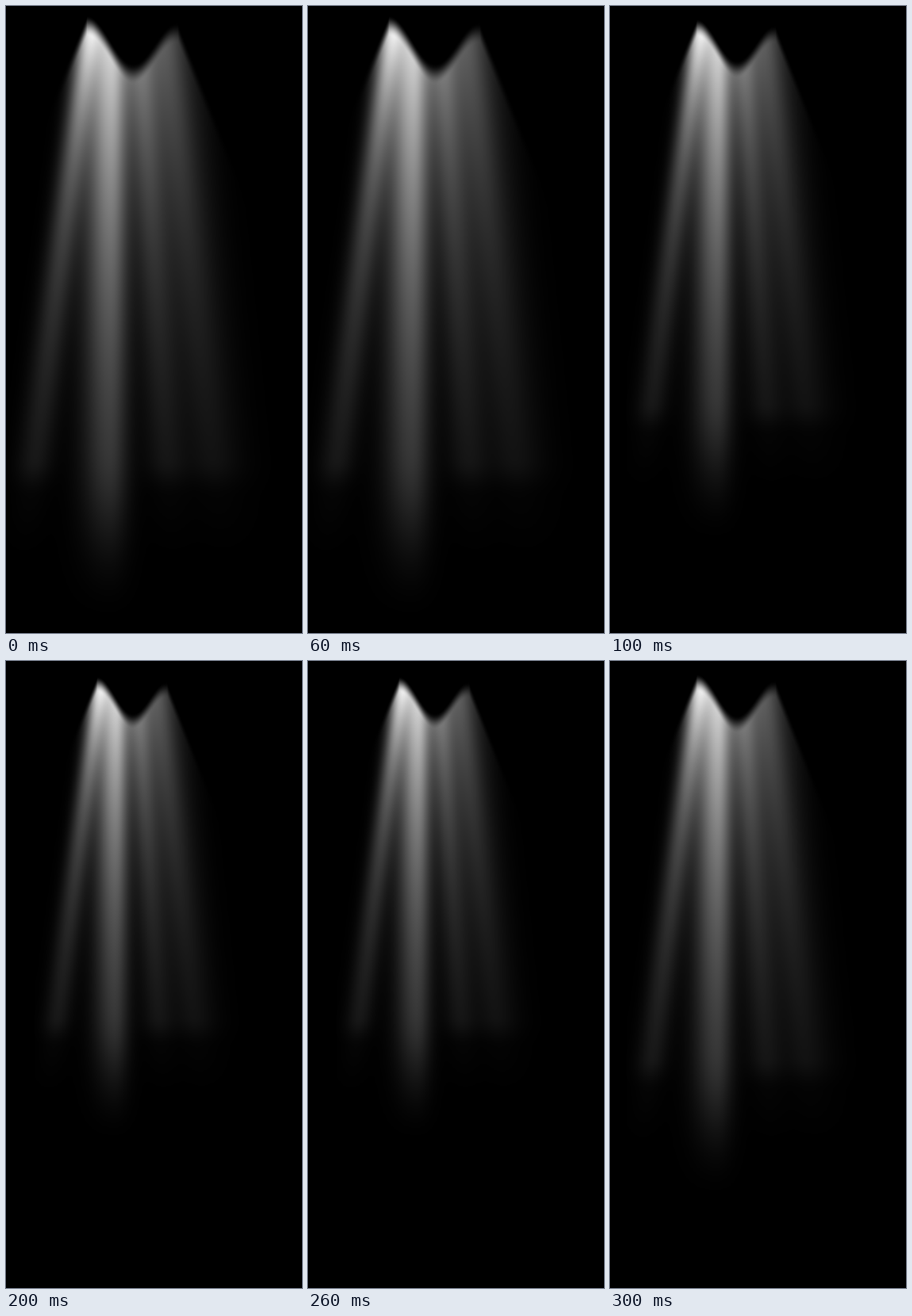
These frames come from a looping animation (373 by 791 pixels, 0.4 s). An HTML page with a canvas:

```html
<!DOCTYPE html>
<html lang="en">
<head>
<meta charset="utf-8">
<title>Flickering flame</title>
<style>
  html, body { margin: 0; width: 100%; height: 100%; overflow: hidden; background: #000; }
  canvas { display: block; width: 100vw; height: 100vh; }
</style>
</head>
<body>
<canvas id="stage" width="373" height="791"></canvas>
<script>
const W = 373, H = 791;
const ctx = document.getElementById('stage').getContext('2d');

const PIVOT = { x: 158, y: 44 };
const SCALES = [1, 0.866, 0.77, 0.866];
const STEP = 100;

// Rays fan out downwards; from and to are centre and width at the two ends.
const rays = [
  { from: [104, 10], to: [34, 16],  light: 0.62, decay: 300 },
  { from: [132, 21], to: [130, 24], light: 0.95, decay: 380, long: true },
  { from: [166, 13], to: [203, 19], light: 0.55, decay: 300 },
  { from: [196, 16], to: [258, 20], light: 0.36, decay: 300 },
  { from: [222, 20], to: [282, 24], light: 0.10, decay: 400 }
];

const mix = (a, b, u) => a + (b - a) * u;
const ease = v => {
  v = Math.max(0, Math.min(1, v));
  return v * v * (3 - 2 * v);
};

// Upper outline: a cosine dip between two horns, straight shoulders outside.
function outline(x) {
  const d = x - 159, half = 57;
  const arch = 44 + 28 * Math.cos(Math.PI * Math.min(1, Math.abs(d) / half));
  return arch + 0.08 * d + 2.4 * Math.max(0, Math.abs(d) - half);
}

function rayAt(ray, y) {
  const u = (y - 30) / 560;
  const end = ray.long
    ? ease((780 - y) / 220)
    : 0.75 * ease((620 - y) / 50) + 0.25 * ease((710 - y) / 110);
  return {
    x: mix(ray.from[0], ray.to[0], u),
    w: mix(ray.from[1], ray.to[1], u),
    right: ray.long ? 0.7 : 1,
    light: ray.light * Math.exp(-y / ray.decay) * end
  };
}

function glow(ray, x) {
  const d = (x - ray.x) / ray.w;
  return ray.light * Math.exp(-((d > 0 ? d / ray.right : d) ** 2) / 2);
}

function paintFlame() {
  const canvas = document.createElement('canvas');
  canvas.width = W;
  canvas.height = H;
  const c = canvas.getContext('2d');
  const image = c.createImageData(W, H);
  image.data.fill(255);
  for (let y = 0; y < H; y++) {
    const row = rays.map(ray => rayAt(ray, y));
    for (let x = 0; x < W; x++) {
      const light = row.reduce((sum, ray) => sum + glow(ray, x), 0);
      image.data[(y * W + x) * 4 + 3] = 255 * light * ease((y - outline(x)) / 26);
    }
  }
  c.putImageData(image, 0, 0);
  return canvas;
}

const flame = paintFlame();
const start = performance.now();

function draw(t) {
  const s = SCALES[Math.floor(t / STEP) % SCALES.length];
  ctx.fillStyle = '#000';
  ctx.fillRect(0, 0, W, H);
  ctx.drawImage(flame, PIVOT.x * (1 - s), PIVOT.y * (1 - s), W * s, H * s);
}

function tick() {
  draw(Math.max(0, performance.now() - start));
  requestAnimationFrame(tick);
}
tick();
</script>
</body>
</html>
```
